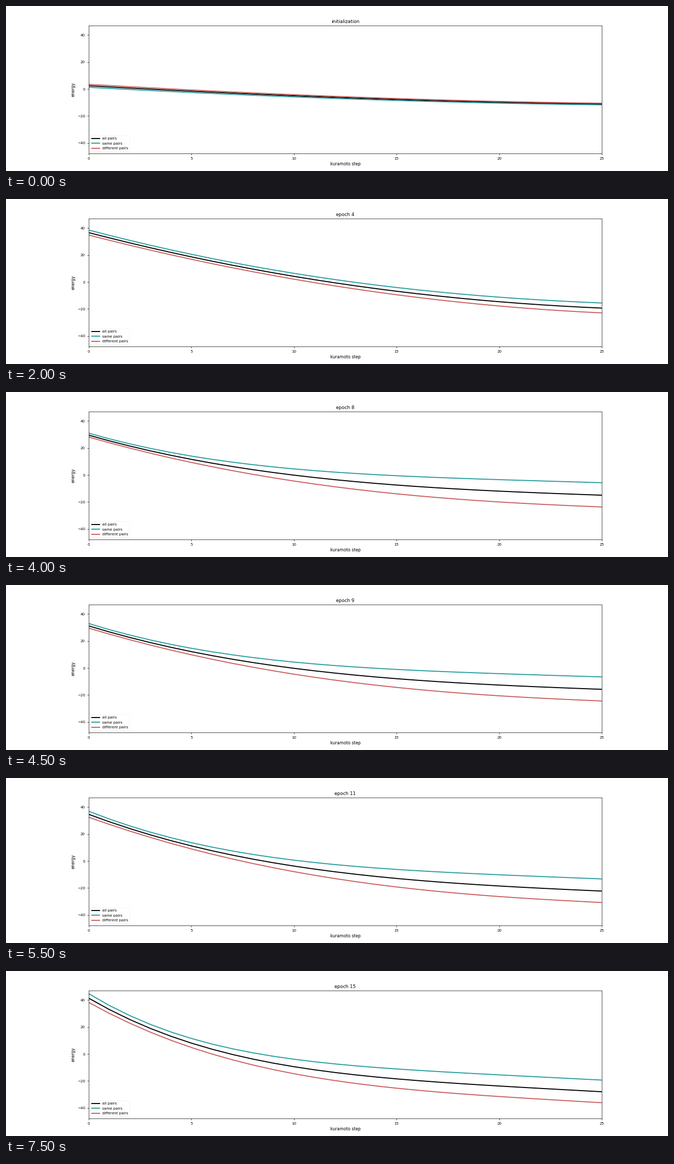
These frames come from a looping animation (1280 by 320 pixels, 8 s). A matplotlib script:

```python
import numpy as np
import matplotlib.pyplot as plt
from matplotlib.animation import FuncAnimation

plt.rcParams.update({
    "font.family": "DejaVu Sans",
    "axes.titlesize": 10,
    "axes.labelsize": 9,
    "xtick.labelsize": 8,
    "ytick.labelsize": 8,
    "xtick.major.pad": 4.5,
    "ytick.major.pad": 4.5,
    "legend.fontsize": 8,
})

EPOCHS = 16
STEPS = np.arange(26)
SAME_SHARE = 0.485  # part of all pairs that are "same" pairs
TAIL = 0.3          # straight part of the decay


def track(epoch, **points):
    """Linear path through a few points given as e<epoch>=value."""
    return np.interp(epoch, [int(k[1:]) for k in points],
                     list(points.values()))


def decay(start, end, bend):
    left = 1 - STEPS / STEPS[-1]
    shape = (1 - TAIL) * left**bend + TAIL * left
    return end + (start - end) * shape


def energies(epoch):
    """Energy of all, same and different pairs during one epoch."""
    start = track(epoch, e0=2.4, e4=36.7, e8=29.6, e15=41.5)
    start_gap = track(epoch, e0=-1.1, e4=1.85, e6=0.2, e8=1.45, e15=3.25)
    end = track(epoch, e0=-11.1, e3=-4, e4=-19.2, e6=-13,
                e9=-15.5, e10=-21.7, e13=-22.6, e15=-27.7)
    end_gap = track(epoch, e0=-0.6, e4=3.65, e6=3.9, e8=9, e15=8.4)
    bend = track(epoch, e0=1.85, e4=2.1, e6=3.15, e11=3.25, e15=4.2)
    bend_gap = 0.008 * end_gap**2

    same, different = (
        decay(start + side * start_gap, end + side * end_gap,
              bend + side * bend_gap)
        for side in (1, -1)
    )
    both = SAME_SHARE * same + (1 - SAME_SHARE) * different
    return both, same, different


fig, ax = plt.subplots(figsize=(20, 5), dpi=64)
fig.subplots_adjust(left=0.125, right=0.9, bottom=0.107, top=0.88)
ax.set_xlim(0, 25)
ax.set_ylim(-47.67, 46.9)
ax.set_xticks(range(0, 26, 5))
ax.set_yticks(range(-40, 41, 20))
ax.set_xlabel("kuramoto step")
ax.set_ylabel("energy")
title = ax.set_title("initialization")

lines = [
    ax.plot([], [], color=color, lw=2.2, label=label)[0]
    for label, color in [("all pairs", "black"),
                         ("same pairs", "#2a9da0"),
                         ("different pairs", "#cb5f5f")]
]
ax.legend(loc="lower left", edgecolor="0.95")


def update(epoch):
    for line, values in zip(lines, energies(epoch)):
        line.set_data(STEPS, values)
    title.set_text(f"epoch {epoch}" if epoch else "initialization")
    return [*lines, title]


anim = FuncAnimation(fig, update, frames=EPOCHS, interval=500,
                     repeat=True, repeat_delay=0, blit=False)
plt.show()
```
